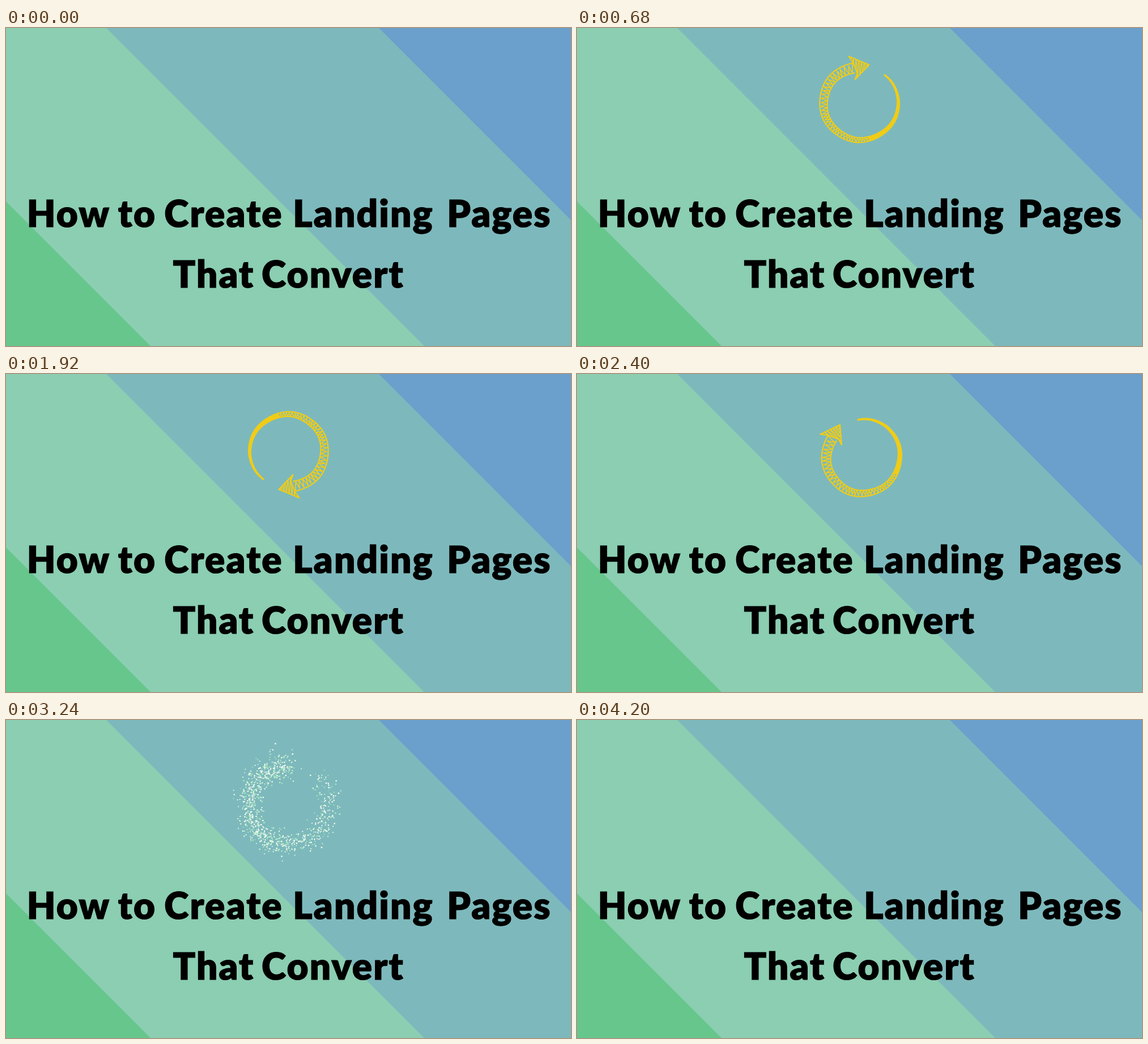
Write an HTML page with a canvas that moves like this. It is 997 px wide and 561 px high and loops after 4.36 s.

```html
<!DOCTYPE html>
<html lang="en">
<head>
<meta charset="utf-8">
<title>Landing pages</title>
<style>
  html, body { margin: 0; width: 100%; height: 100%; overflow: hidden; background: #7db9bc; }
  svg, canvas { position: absolute; left: 0; top: 0; display: block; }
  text {
    font: 900 65.5px Lato, "Open Sans", sans-serif;
    letter-spacing: 2.2px;
    text-anchor: middle;
    stroke: #000;
    stroke-width: 1.2px;
  }
</style>
</head>
<body>
<svg width="997" height="561" viewBox="0 0 997 561">
  <rect width="997" height="561" fill="#7db9bc"/>
  <path d="M0 0H177L738 561H0Z" fill="#8bceb2"/>
  <path d="M0 306L255 561H0Z" fill="#66c68b"/>
  <path d="M658 0H997V339Z" fill="#6aa0cb"/>
  <g>
    <text x="110.5" y="351">How</text>
    <text x="231.5" y="351">to</text>
    <text x="384" y="351">Create</text>
    <text x="630.5" y="351">Landing</text>
    <text x="870.5" y="351">Pages</text>
    <text x="366.5" y="458">That</text>
    <text x="577" y="458">Convert</text>
  </g>
</svg>
<canvas id="stage" width="997" height="561"></canvas>
<script>
const ctx = document.getElementById('stage').getContext('2d');
const LOOP = 4360, STEP = 40;
const PIVOT = { x: 498.5, y: 142.5 };
const RING_Y = 5;               // ring centre sits below the pivot
const SPIN_START = 1000, BURST = 2840;
const YELLOW = '#f0cc17';
const rad = d => d * Math.PI / 180;
const clamp = v => Math.max(0, Math.min(1, v));

function seeded(s) {
  return () => {
    s = (s + 0x6d2b79f5) | 0;
    let t = Math.imul(s ^ (s >>> 15), 1 | s);
    t = (t + Math.imul(t ^ (t >>> 7), 61 | t)) ^ t;
    return ((t ^ (t >>> 14)) >>> 0) / 4294967296;
  };
}

// Ring band: u runs clockwise from the thin tail (0) to the arrow head (1).
const bandAngle = u => rad(-47.4 + 308 * u);
const bandWidth = u => 1.2 + 18 * u;
const outerRadius = u => 71 - 5 * clamp(1 - u / 0.15) + 0.4 * Math.sin(u * 31);
function bandPoint(u, depth) {
  const r = outerRadius(u) - bandWidth(u) * depth, a = bandAngle(u);
  return [r * Math.cos(a), RING_Y + r * Math.sin(a)];
}

function polyline(points, closed) {
  const p = new Path2D();
  points.forEach(([x, y], i) => i ? p.lineTo(x, y) : p.moveTo(x, y));
  if (closed) p.closePath();
  return p;
}
const sweep = (from, to, depth, n = 90) =>
  Array.from({ length: n + 1 }, (_, i) => bandPoint(from + (to - from) * i / n, depth));

const HEAD = [[17, -61], [-19, -76], [-12, -66], [-4, -46], [-8, -35]];
const headPath = polyline(HEAD, true);
const edges = [polyline(sweep(0, 1, 0.04)), polyline(sweep(0, 1, 0.96))];
const tail = polyline([...sweep(0, 0.4, 0), ...sweep(0.4, 0, 1)], true);
const hatch = (() => {
  const rnd = seeded(7), pts = [];
  let side = 0;
  for (let u = 0.38; u < 1; u += 0.0035 + 0.0045 * u + 0.004 * rnd()) {
    pts.push(bandPoint(u, side ? 0.92 : 0.08 + 0.15 * rnd()));
    side = 1 - side;
  }
  return polyline(pts);
})();
const headHatch = polyline(Array.from({ length: 15 }, (_, i) =>
  [-18 + i * 2.4, i % 2 ? -78 : -34]));

function drawArrow(y, angle, alpha) {
  ctx.save();
  ctx.globalAlpha = alpha;
  ctx.translate(PIVOT.x, y);
  ctx.rotate(angle);
  ctx.fillStyle = ctx.strokeStyle = YELLOW;
  ctx.lineJoin = ctx.lineCap = 'round';
  ctx.fill(tail);
  ctx.lineWidth = 2.2;
  edges.forEach(e => ctx.stroke(e));
  ctx.lineWidth = 1.7;
  ctx.stroke(hatch);
  ctx.lineWidth = 2;
  ctx.stroke(headPath);
  ctx.clip(headPath);
  ctx.lineWidth = 1.6;
  ctx.stroke(headHatch);
  ctx.restore();
}

// Soft glow: a swollen copy of the ring built from overlapping discs.
const coreWidth = a => a < 18 ? 0 : 51 * (1 - Math.pow(1 - (a - 18) / 250, 5));
function discs(from, widthAt) {
  const p = new Path2D();
  for (let a = from; a <= 268; a += 1.5) {
    const mid = 68 - 8 * clamp((a - 18) / 162), r = widthAt(a) / 2;
    const x = mid * Math.cos(rad(a)), y = RING_Y + mid * Math.sin(rad(a));
    p.moveTo(x + r, y);
    p.arc(x, y, r, 0, 7);
  }
  return p;
}
const core = discs(18, coreWidth);
const halos = [30, 22, 13].map(w => discs(-48, a => Math.max(15 + w, coreWidth(a) + w)));

function drawGlow(alpha) {
  ctx.save();
  ctx.translate(PIVOT.x, PIVOT.y);
  ctx.fillStyle = '#98c092';
  ctx.globalAlpha = 0.15 * alpha;
  ctx.filter = 'blur(2.5px)';
  halos.forEach(h => ctx.fill(h));
  ctx.filter = 'none';
  ctx.globalAlpha = alpha;
  ctx.fillStyle = '#8bceb1';
  ctx.fill(core);
  ctx.restore();
}

// Sparks start on the arrow and drift mostly outwards.
const sparks = (() => {
  const rnd = seeded(42), tints = ['#f6fcf0', '#f6fcf0', '#dcf5de', '#a8ecbd'];
  const bell = () => rnd() + rnd() + rnd() - 1.5;
  return Array.from({ length: 950 }, () => {
    let x, y;
    if (rnd() < 0.07) {
      const k = Math.sqrt(rnd()), m = rnd();
      x = 17 + k * (-36 + 11 * m);
      y = -61 + k * (-15 + 41 * m);
    } else {
      [x, y] = bandPoint(Math.pow(rnd(), 0.72), rnd());
    }
    const out = Math.atan2(y - RING_Y, x);
    const push = 0.15 + 0.56 * bell(), side = 0.35 * bell();
    return {
      x, y,
      vx: push * Math.cos(out) - side * Math.sin(out),
      vy: push * Math.sin(out) + side * Math.cos(out),
      size: 1.7 + 1.1 * rnd(),
      tint: tints[Math.floor(rnd() * 4)],
      birth: 2920 + 170 * rnd(),
      death: 3280 + 910 * Math.pow(rnd(), 1.15),
    };
  });
})();

function drawSparks(t) {
  const reach = 38 * Math.sqrt((t - BURST) / 400);
  ctx.save();
  ctx.translate(PIVOT.x - 0.006 * (t - BURST), PIVOT.y);
  for (const s of sparks) {
    const alpha = clamp((t - s.birth) / 90) * clamp((s.death - t) / 130);
    if (!alpha) continue;
    ctx.globalAlpha = alpha;
    ctx.fillStyle = s.tint;
    ctx.beginPath();
    ctx.arc(s.x + s.vx * reach, s.y + s.vy * reach, s.size / 2, 0, 7);
    ctx.fill();
  }
  ctx.restore();
}

// Height above rest: a fall, then ever smaller parabolic hops.
function dropHeight(t) {
  const fall = 415, g = 219 / (fall * fall);
  if (t < fall) return 219 - g * t * t;
  let start = fall, half = 157;
  for (let i = 0; i < 3; i++) {
    if (t < start + 2 * half) return g * (half * half - (t - start - half) ** 2);
    start += 2 * half;
    half *= 0.38;
  }
  return 0;
}

function draw(t) {
  ctx.clearRect(0, 0, 997, 561);
  if (t < STEP || t >= 4200) return;
  if (t < 2900) {
    const u = clamp((t - SPIN_START) / (BURST - SPIN_START));
    drawArrow(PIVOT.y - dropHeight(t), Math.PI * (1 - Math.cos(Math.PI * u)),
      clamp(1 - (t - 2800) / 100));
  }
  if (t >= BURST) {
    const glow = t <= 2920 ? 0.4 + 0.6 * (t - BURST) / 80 : clamp((3160 - t) / 240);
    if (glow > 0) drawGlow(glow);
    drawSparks(t);
  }
}

const begin = performance.now();
function tick() {
  const t = (performance.now() - begin) % LOOP;
  draw(Math.floor(t / STEP) * STEP);
  requestAnimationFrame(tick);
}
tick();
</script>
</body>
</html>
```
